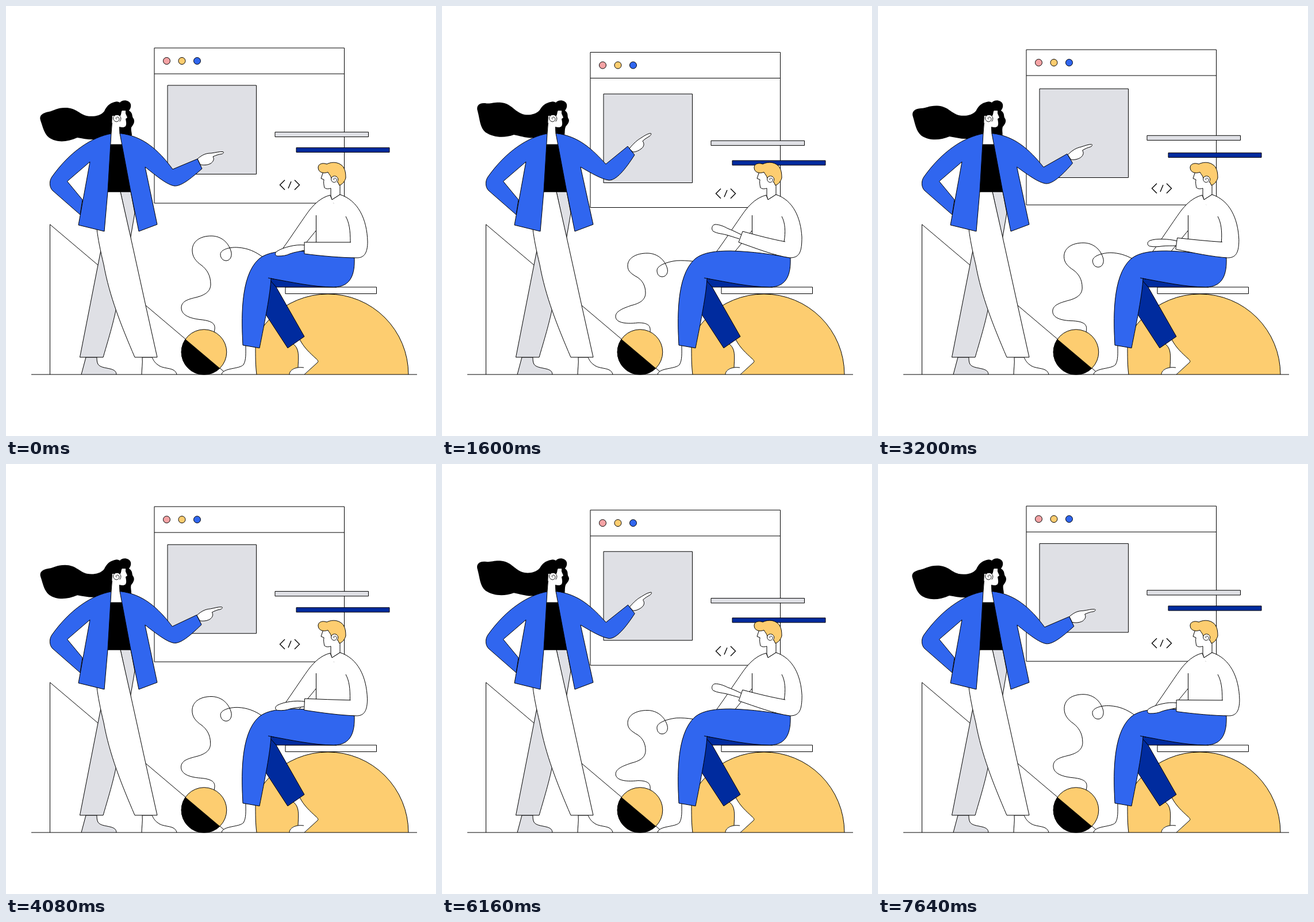
An HTML page with a canvas that plays this animation: 748 by 748 pixels, repeating every 7680 ms.

```html
<!DOCTYPE html>
<html lang="en">
<head>
<meta charset="utf-8">
<title>Presentation</title>
<style>
html, body { margin: 0; width: 100%; height: 100%; overflow: hidden; background: #fff; }
canvas { display: block; width: 748px; height: 748px; }
</style>
</head>
<body>
<canvas id="stage"></canvas>
<script>
const SIZE = 748, LOOP = 7680, SWING = 3840, STEP = 40;
const BLUE = '#3066ef', NAVY = '#002b9e', YELLOW = '#fdcd70';
const GRAY = '#dfe0e5', PINK = '#f5a3a5', BLACK = '#000', WHITE = '#fff';

const canvas = document.getElementById('stage');
const ctx = canvas.getContext('2d');
const dpr = window.devicePixelRatio || 1;
canvas.width = canvas.height = SIZE * dpr;

// Moving outlines: resting pose and raised pose, with matching commands.
const POSES = {
  curl: [
    'M362 567 C365 556 364 548 338 545.5 C316 543 305 536 305 525 C305 513 318 510 330 507 C347 503 356 496 356 484 C356 468 349 458 340 451 C330 444 324 436 324 425 C324 409 338 400 357 400 C375 400 388 412 392 429 C393 437 389 443 383 443 C377 443 373 438 373 432 C373 424 388 419 403 420 C420 421 434 427 447 437',
    'M362 567 C363 557 360 551 341 551 C317 554 302 550 302 540 C302 530 318 525 329 521 C345 517 354 511 354 499 C354 486 348 477 340 472 C330 466 323 462 323 452 C323 438 338 430 357 430 C375 430 388 442 392 457 C394 465 389 471 383 471 C377 471 374 466 374 460 C374 451 392 445 408 443 C418 442.5 427 443 436 444'
  ],
  mane: [
    'M190 167 C180 168 174 176 171 183 C164 192 150 193 140 191 C126 187 122 177 103 177 C88 177 84 182 74 184 C64 186 57 190 60 199 C64 210 66 222 75 229 C88 238 106 237 124 229 C136 231 150 234 160 231 L184 224 L186 190 Z',
    'M190 167 C180 168 174 174 170 181 C163 189 152 190 144 189 C126 185 122 170 103 168 C90 167 84 171 75 169 C64 168 59 174 62 183 C66 198 66 212 76 220 C90 229 108 230 125 224 C136 226 150 231 160 229 L184 224 L186 190 Z'
  ],
  bob: [
    'M184 210 C180 190 180 170 189 167 C193 165 197 167 198 168 C202 162 215 163 217 171 C218 176 216 179 214 182 C222 187 218 192 222 196 C225 202 221 207 218 211 C217 216 219 220 219 225 L198 225 Z',
    'M184 210 C180 190 180 170 189 167 C193 165 197 167 198 168 C202 162 215 163 217 171 C218 176 216 179 214 182 C221 187 217 192 220 196 C223 201 218 206 215 210 C213 215 214 220 213 225 L198 225 Z'
  ],
  pointer: [
    'M333 266 C342 258 349 256 357 256 C365 255 371 253 377 253.5 C380 254 378 257 375 257.5 C369 258 365 260 360 262 C363 267 360 271 356 274 C350 277 344 277 338 276 Z',
    'M326 248 C333 239 340 233 347 229 C353 225 358 222 363 221.5 C365 222 363 225 361 226.5 C357 229 353 231 349 235 C352 239 352 244 347 248 C342 252 337 254 332 254 Z'
  ],
  jacket: [
    'M198 221.5 C238 226 265 250 290 284 L333 266 L341 283 C326 296 306 314 293 313 C280 311 262 296 242 280 L263 380 L231 392 L217 323 Z',
    'M198 221.5 C238 226 262 250 285 275 L323 244 L335 259 C319 284 303 304 290 303 C277 301 260 291 241 280 L263 380 L231 392 L217 323 Z'
  ],
  back: [
    'M611 438 C624 438 629 428 629 410 C628 370 612 338 581 328 L567 337 L564 329',
    'M605 438 C622 438 626 428 626 402 C624 368 611 338 581 328 L567 337 L564 329'
  ],
  palm: [
    'M520 416 C511 415 502 416 494 418 C485 420 477 423 471 427 C467 430 468 435 473 435 C481 435 488 434 494 431 C502 428 511 427 519 425',
    'M521 398 C513 394 505 390 497 387 C490 383 482 380 475 380 C469 381 468 389 472 392 C479 396 487 396 494 398 C502 400 510 403 517 405'
  ],
  sleeve: [
    'M600 411 C573 411 546 411 519 411 L519 431 C550 435 585 438 611 438',
    'M597 410 C575 406 548 399 523 392 L516 411 C545 421 577 434 605 438'
  ],
  crease: ['M591 366 C597 377 599 390 599 411', 'M591 366 C597 377 598 393 595 410']
};

const NUM = /-?\d+(\.\d+)?/g;
function pose(name, k) {
  const [a, b] = POSES[name];
  const to = b.match(NUM);
  let i = 0;
  return a.replace(NUM, n => +n + (to[i++] - n) * k);
}

function draw(d, fill, line = BLACK, width = 1) {
  const p = new Path2D(d);
  if (fill) { ctx.fillStyle = fill; ctx.fill(p); }
  if (line) { ctx.strokeStyle = line; ctx.lineWidth = width; ctx.stroke(p); }
}

function box(x, y, w, h, fill) {
  draw(`M${x} ${y} h${w} v${h} h${-w} Z`, fill);
}

function disc(x, y, r, fill) {
  draw(`M${x - r} ${y} a${r} ${r} 0 1 1 ${2 * r} 0 a${r} ${r} 0 1 1 ${-2 * r} 0 Z`, fill);
}

function ear(x, y, r) {
  ctx.fillStyle = WHITE;
  ctx.beginPath();
  ctx.arc(x, y, r, 0, 7);
  ctx.fill();
  ctx.beginPath();
  for (let a = 0; a <= 11.5; a += 0.2) {
    const q = r * Math.min(1, 0.1 + a / 9);
    ctx.lineTo(x + q * Math.cos(a + 2), y + q * Math.sin(a + 2));
  }
  ctx.strokeStyle = BLACK;
  ctx.lineWidth = 1;
  ctx.stroke();
}

function backdrop(k) {
  draw('M76.5 641 V380 L385 641');
  disc(344.5, 602, 39.3, YELLOW);
  ctx.save();
  ctx.clip(new Path2D('M76 380 L385 641 H76 Z'));
  disc(344.5, 602, 39.3, BLACK);
  ctx.restore();
  draw(pose('curl', k));
}

function browser(t) {
  const top = 73 + 9 * t, drop = 18 * t;
  box(258, top, 330.5, 270, WHITE);
  draw(`M258 ${top + 45} h330.5`);
  [PINK, YELLOW, BLUE].forEach((c, i) => disc(279.5 + 26.5 * i, top + 22.5, 6, c));
  box(281, 138 + drop, 154.5, 154.5, GRAY);
  box(468, 219.3 + drop, 162.5, 8.3, GRAY);
  box(505, 246.4 + 27 * t, 162, 8, NAVY);
  const y = 311.3 + drop;
  draw(`M485 ${y - 8.5} l-8.5 8.5 l8.5 8.5 M496 ${y - 6} l-5 12 M502 ${y - 8.5} l8.5 8.5 l-8.5 8.5`, null, BLACK, 1.4);
}

function man(k) {
  draw('M420 641 A140 140 0 0 1 700 641', YELLOW);
  box(486, 489, 158.5, 11.5, WHITE);
  // back leg
  draw('M500 588 C510 597 509 606 508 629 C499 629 493 634 493 641 H520 L542 620 C544 618 542 616 540 614 C528 603 518 594 511 580 Z', WHITE, null);
  draw('M500 588 C510 597 509 606 508 629 M518 629 C502 627 493 634 493 641 M519 641 L542 620 C544 618 542 616 540 614 C528 603 518 594 511 580');
  draw('M458 473 L470 489 L519 575 L490 595 L445 526 Z', NAVY);
  draw('M456 473 L470 489 H575 Z', NAVY);
  // front foot
  draw('M375 641 C377 629 406 632 413 624 C418 616 417 604 417 590 H434 C434 610 434 625 436 641', WHITE);

  // head
  draw('M552 288 L548 300 L553 302 C552 307 553 312 554 316 C557 319 562 318 565 317 L565 330 L567 337 L581 328 L581 306 L566 286 Z', WHITE);
  draw('M543 281 C543 275 550 272 558 275 C565 271.5 574 271 581 275 C590 280 591 290 591 299 C589 306 585 310 580 312 L577 306 L566 300 C565 295 562 293 560 289 C553 292 543 290 543 281 Z', YELLOW);
  ear(571.5, 302, 6.2);

  // far arm and torso
  draw('M564 329 C548 333 537 344 528 355 C516 371 494 405 477 428 H508 L545 385 Z', WHITE, null);
  draw('M564 329 L539 345 V432 H606 Z', WHITE, null);
  draw(pose('back', k), WHITE);
  draw('M564 329 C548 333 537 344 528 355 C516 371 494 405 477 428 M539.5 364 V411 M539 391 L508 429');

  // front leg
  draw('M412 590 C410 550 406 470 440 440 C454 428 478 426 502 426 C540 427 575 432 606 438 C607 465 601 489 570 489 C535 489 495 480 461 474 C460 500 450 550 441 595 Z', BLUE);
  draw('M456 473 L466 475');

  draw(pose('palm', k), WHITE);
  draw(pose('sleeve', k) + ' L617 415', WHITE, null);
  draw(pose('sleeve', k));
  draw(pose('crease', k));
}

function woman(k) {
  // back leg and feet
  draw('M192 641 C192 627 166 633 160 623 C158 619 158 615 158 611 H139 L131 641', GRAY);
  draw('M297 641 C294 627 274 633 264 624 C258 620 256 615 254 611 H237 C238 622 236 632 236 641', WHITE);
  draw('M165 425 L128.5 611 H169 C181 570 187 550 193 520', GRAY);
  draw('M199 323 H217 L224 360 L216.5 404 Z', GRAY);
  // front leg
  draw('M177 323 H199 L217 403 L243 521 L263 611 H224 C200 555 180 505 170 450 C164 425 160 405 158 388', WHITE);

  // head
  draw(pose('mane', k), BLACK, null);
  draw(pose('bob', k), BLACK, null);
  draw('M185 191 L199 191 C201 188 200 184 202 182 L208 182 L208 187 L211 194 L208 196.5 C209 201 210 206 208 209 C205 212 201 211 197 210 L198 222 L203 242 H182 L183 222 L184.5 200 Z', WHITE, null);
  ear(193, 196, 6.8);
  draw('M184.5 203 L183 222 M197.5 211 L198 222');

  // clothes
  draw('M182 241 H203 L217 323 H176.5 Z', BLACK);
  draw('M183 222 C150 228 112 252 80 297 C75 304 75 315 81 321 L129 363 L133 337 L106.5 305 L146 271 L126 381 L171 392 L177 323 Z', BLUE);
  draw(pose('pointer', k), WHITE);
  draw(pose('jacket', k), BLUE);
}

function render(ms) {
  const part = ms % SWING / SWING;
  const t = 1 - Math.abs(1 - 2 * part);
  const k = t * 1.2; // the raised pose is reached at 5/6 of the swing
  ctx.setTransform(dpr, 0, 0, dpr, 0, 0);
  ctx.fillStyle = WHITE;
  ctx.fillRect(0, 0, SIZE, SIZE);
  ctx.miterLimit = 3;
  backdrop(k);
  browser(t);
  man(k);
  woman(k);
  draw('M44 641 H715');
}

let start = null;
function tick(now) {
  if (start === null) start = now;
  const ms = (now - start) % LOOP;
  render(Math.floor((ms + 0.5) / STEP) * STEP);
  requestAnimationFrame(tick);
}
render(0);
requestAnimationFrame(tick);
</script>
</body>
</html>
```
